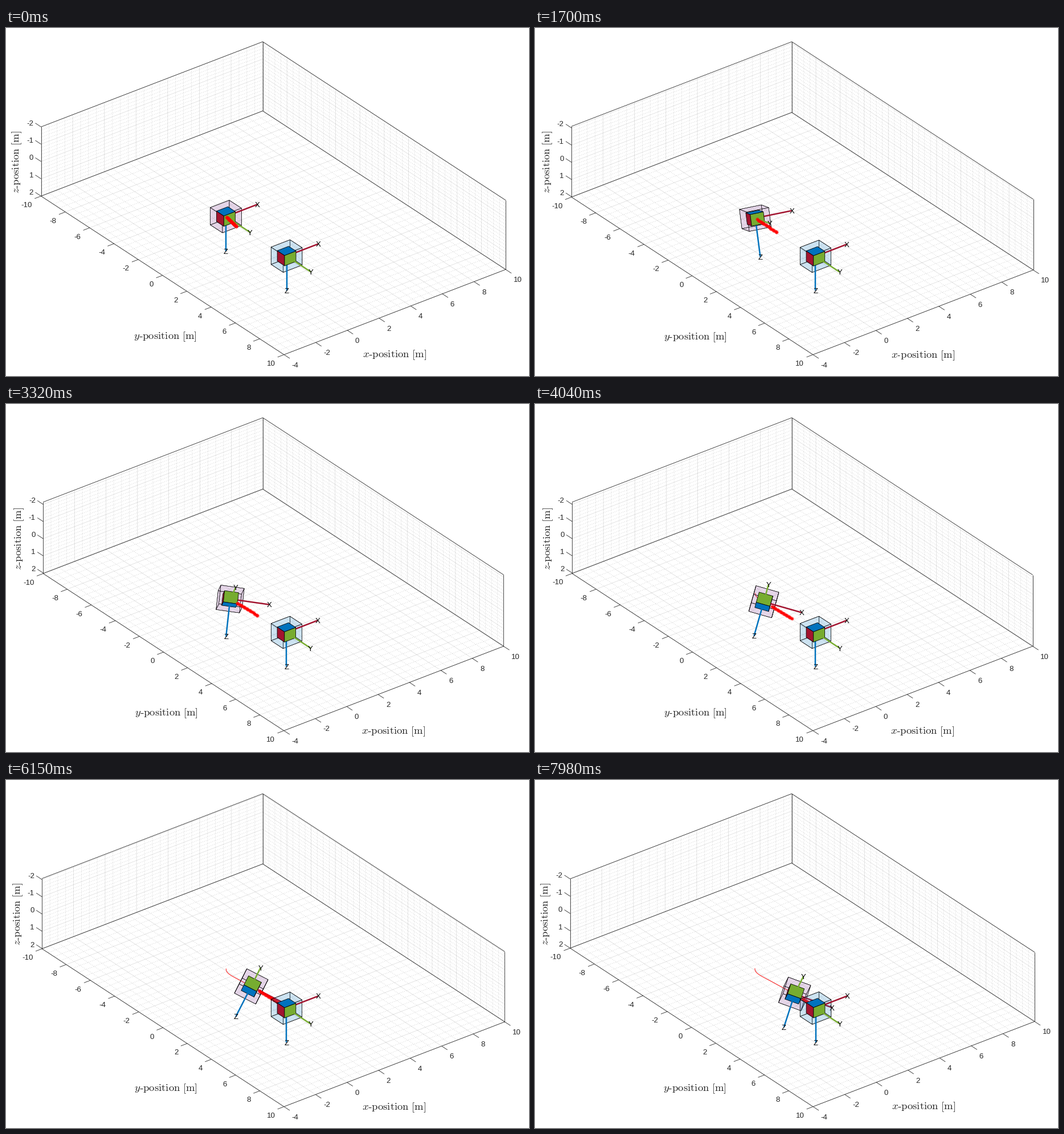
Recreate the animation shown at these times as a matplotlib script. Size 918 by 610 pixels, loop 8000 ms.

```python
import numpy as np
import matplotlib.pyplot as plt
from matplotlib.animation import FuncAnimation
from matplotlib.collections import LineCollection, PolyCollection
from matplotlib.colors import to_rgba

W, H, DPI = 918, 610, 100
PX = 72 / DPI                      # points per pixel
STEP, LOOP = 40, 8000
BEAT = 0.1008                      # seconds between refreshes

plt.rcParams["font.family"] = "Liberation Sans"
plt.rcParams["mathtext.fontset"] = "cm"

# Orthographic camera: rows are screen right, screen down, towards the viewer.
AZ, EL = np.radians(37.5), np.radians(30)
CAM = np.array([
    [np.cos(AZ), np.sin(AZ), 0],
    [-np.sin(AZ) * np.sin(EL), np.cos(AZ) * np.sin(EL), np.cos(EL)],
    [-np.sin(AZ) * np.cos(EL), np.cos(AZ) * np.cos(EL), -np.sin(EL)],
])
SCALE = 35.03
CENTRE = np.array([469.3, 298.3])
FIT = 14 * abs(CAM[1, 0]) + 20 * CAM[1, 1] + 4 * CAM[1, 2]

AXIS_COLORS = ["#A2142F", "#77AC30", "#0072BD"]
HALF = np.array([0.6, 0.5, 0.5])
CORE = 0.6


def ramp(t, a, b):
    return np.clip((t - a) / (b - a), 0, 1)


def ease(t, a, b):
    u = ramp(t, a, b)
    return u * u * (3 - 2 * u)


def soft_start(t, t0, width):
    """Zero before t0, then a straight climb, with a rounded corner."""
    return width * np.logaddexp(0, (t - t0) / width)


def drift(t):
    """Chaser's way from the start, in view units right and down."""
    return np.array([0.4 * soft_start(t, 2.98, 0.4), 0.214 * soft_start(t, 2, 0.6)])


def attitude(t):
    """Chaser's rotation from its turn vector in degrees (Rodrigues)."""
    u = ramp(t, 0.3, 3.8)
    turn = np.radians([
        -49 * u + 7 * (ease(t, 4, 4.8) - ease(t, 4.8, 6)),
        -47 * ease(t, 1, 5.6) + 8 * ease(t, 6.2, 8),
        35 * u - 5 * ease(t, 4.8, 8),
    ])
    angle = np.linalg.norm(turn) + 1e-9
    x, y, z = turn / angle
    k = np.array([[0, -z, y], [z, 0, -x], [-y, x, 0]])
    return np.eye(3) + np.sin(angle) * k + (1 - np.cos(angle)) * k @ k


class View:
    """Axes box fitted to the stage; its z range swells and shrinks a little."""

    def __init__(self, t):
        extra = 0.165 * (ease(t, 0.2, 2.6) - ease(t, 3.4, 8.6))
        self.lo, self.hi = -2 - 0.8 * extra, 2 + 0.2 * extra
        self.s = SCALE * FIT / (FIT + CAM[1, 2] * extra)
        self.mid = np.array([3, 0, (self.lo + self.hi) / 2])

    def __call__(self, *p):
        return CENTRE + self.s * (CAM[:2] @ (np.array(p) - self.mid))


def face(axis, sign, half):
    j, k = [n for n in range(3) if n != axis]
    pts = np.zeros((4, 3))
    pts[:, axis] = sign * half[axis]
    pts[:, j] = np.array([-1, 1, 1, -1]) * half[j]
    pts[:, k] = np.array([-1, -1, 1, 1]) * half[k]
    return pts


fig = plt.figure(figsize=(W / DPI, H / DPI), dpi=DPI, facecolor="white")
ax = fig.add_axes([0, 0, 1, 1])
ax.set_xlim(0, W)
ax.set_ylim(H, 0)
ax.axis("off")


def lines(color, width, z, **kw):
    return ax.add_collection(
        LineCollection([], colors=[color], linewidths=width * PX, zorder=z, **kw),
        autolim=False)


def polys(z, width, **kw):
    return ax.add_collection(
        PolyCollection([], edgecolors="black", linewidths=width * PX, zorder=z, **kw),
        autolim=False)


def label(s, ha, z=5):
    return ax.text(0, 0, s, fontsize=13.2 * PX, ha=ha, va="baseline",
                   color="0.15" if z == 5 else "black", zorder=z)


class Body:
    """Translucent shell, solid core and three labelled axes."""

    def __init__(self, tint, z):
        self.z = z
        self.shell = polys(z, 0.55, facecolors=[to_rgba(tint, 0.1)])
        self.core = polys(z + 2, 0.8)
        self.arms = [ax.plot([], [], color=c, lw=2.5 * PX,
                             solid_capstyle="butt")[0] for c in AXIS_COLORS]
        self.names = [label(s, "center", z + 4) for s in "XYZ"]

    def pose(self, c, rot, s):
        view = CAM @ rot

        def flat(p):
            return c + s * (p @ view[:2].T)

        sides = [(i, sign) for i in range(3) for sign in (-1, 1)]
        seen = [(i, sign) for i, sign in sides if sign * view[2, i] > 0]
        self.shell.set_verts([flat(face(*f, HALF)) for f in sides])
        self.core.set_verts([flat(face(*f, CORE * HALF)) for f in seen])
        self.core.set_facecolor([AXIS_COLORS[i] for i, _ in seen])

        for i in range(3):
            out = view[2, i] > 0
            ends = np.zeros((2, 3))
            ends[:, i] = CORE * HALF[i] if out else 0, 2
            ends = flat(ends)
            self.arms[i].set_data(*ends.T)
            self.arms[i].set_zorder(self.z + (3 if out else 1))
            self.names[i].set_position(ends[1] + (0, 4.7))


class AxisTitle:
    """Italic letter, hyphen stroke and roman text."""
    EM = 18.67

    def __init__(self, letter, advance, turned=False):
        self.turned = turned
        self.text = ax.text(0, 0, rf"${letter}\hspace{{0.38}}\mathrm{{position\ [m]}}$",
                            fontsize=self.EM * PX, ha="left", va="baseline",
                            color="0.15", rotation=90 if turned else 0,
                            rotation_mode="anchor", zorder=5)
        self.dash, = ax.plot([], [], color="0.15", lw=1.1 * PX,
                             solid_capstyle="butt", zorder=5)
        self.span = np.array([advance + 0.015, advance + 0.275]) * self.EM

    def place(self, x, y):
        self.text.set_position((x, y))
        rise = 0.215 * self.EM
        if self.turned:
            self.dash.set_data([x - rise] * 2, y - self.span)
        else:
            self.dash.set_data(x + self.span, [y - rise] * 2)


minor = lines(to_rgba("0.1", 0.27), 0.7, 1, linestyles=[(0, (1.4, 3))])
major = lines(to_rgba("0.15", 0.15), 0.8, 2)
frame_box = lines("0.15", 0.8, 3)
xs, ys, zs = range(-4, 11, 2), range(-10, 11, 2), range(-2, 3)
x_nums = [label(str(v), "left") for v in xs]
y_nums = [label(str(v), "right") for v in ys]
z_nums = [label(str(v), "right") for v in zs]
titles = AxisTitle("x", 0.5715), AxisTitle("y", 0.49), AxisTitle("z", 0.465, True)

trail, = ax.plot([], [], color="red", lw=0.9 * PX, zorder=9)
chaser = Body((0.494, 0.184, 0.556), 10)
forecast, = ax.plot([], [], ls="none", marker=(8, 2, 0), ms=6 * PX,
                    mew=0.65 * PX, color="red", zorder=16)
station = Body((0, 0.447, 0.741), 20)


def grid(v, xv, yv, zv):
    segs = [[v(x, 10, v.hi), v(x, -10, v.hi), v(x, -10, v.lo)] for x in xv]
    segs += [[v(-4, y, v.hi), v(10, y, v.hi), v(10, y, v.lo)] for y in yv]
    segs += [[v(-4, -10, z), v(10, -10, z), v(10, 10, z)] for z in zv]
    return segs


def draw_room(v):
    major.set_segments(grid(v, xs, ys, zs))
    minor.set_segments(grid(
        v, [x for x in np.arange(-4, 10.1, 0.5) if x % 2],
        [y for y in np.arange(-10, 10.1, 0.5) if y % 2],
        [n / 5 for n in range(-10, 11) if n % 5]))

    edges = [[v(-4, -10, z), v(10, -10, z), v(10, 10, z)] for z in (v.lo, v.hi)]
    edges += [[v(x, y, v.lo), v(x, y, v.hi)] for x, y in ((-4, -10), (10, -10), (10, 10))]
    edges.append([v(-4, -10, v.hi), v(-4, 10, v.hi), v(10, 10, v.hi)])

    along_x, along_y = (12 * d / np.linalg.norm(d) for d in CAM[:2, :2].T)
    rows = [
        (x_nums, [v(x, 10, v.hi) for x in xs], along_y, (13.8, 17.3)),
        (y_nums, [v(-4, y, v.hi) for y in ys], -along_x, (-15.6, 14.7)),
        (z_nums, [v(-4, -10, z) for z in zs], -along_y, (-13.4, -7.4)),
    ]
    for nums, spots, tick, shift in rows:
        for num, p in zip(nums, spots):
            edges.append([p, p + tick])
            num.set_position(p + shift + (0, 4.7))
    frame_box.set_segments(edges)

    shifts = (-56.6, 79.5), (-50.3, 111.3), (-38.2, 56)
    mids = v(3, 10, v.hi), v(-4, 0, v.hi), v(-4, -10, (v.lo + v.hi) / 2)
    for title, mid, shift in zip(titles, mids, shifts):
        title.place(*(mid + shift))


def draw_bodies(t, v):
    start = v(0, 0, 0)
    c = start + v.s * drift(t)
    chaser.pose(c, attitude(t), v.s)
    station.pose(v(0, 5, 0), np.eye(3), v.s)

    trail.set_data(*(start[:, None] + v.s * drift(np.linspace(0, t, 80))))

    # The forecast stretches out, and later emerges from behind the core.
    grow = np.sin(np.pi / 2 * ramp(t, 0, 4))
    reach = np.array([0.53 + 0.88 * grow, 0.5 + 0.34 * grow])
    u = np.linspace(0.07 + 0.22 * ease(t, 1.2, 4), 1, 22)
    forecast.set_data(*(c[:, None] + v.s * np.outer(reach, u)))


def refresh_time(i):
    """Last refresh before the frame ends; every fourth beat is held."""
    n = int(((i + 1) * STEP - 1) / 1000 / BEAT)
    return BEAT * (n - 1 if n % 4 == 2 else n)


def update(i):
    t = refresh_time(i)
    v = View(t)
    draw_room(v)
    draw_bodies(t, v)
    return []


anim = FuncAnimation(fig, update, frames=LOOP // STEP, interval=STEP,
                     init_func=lambda: update(0), repeat=True, repeat_delay=0,
                     blit=False)
plt.show()
```
